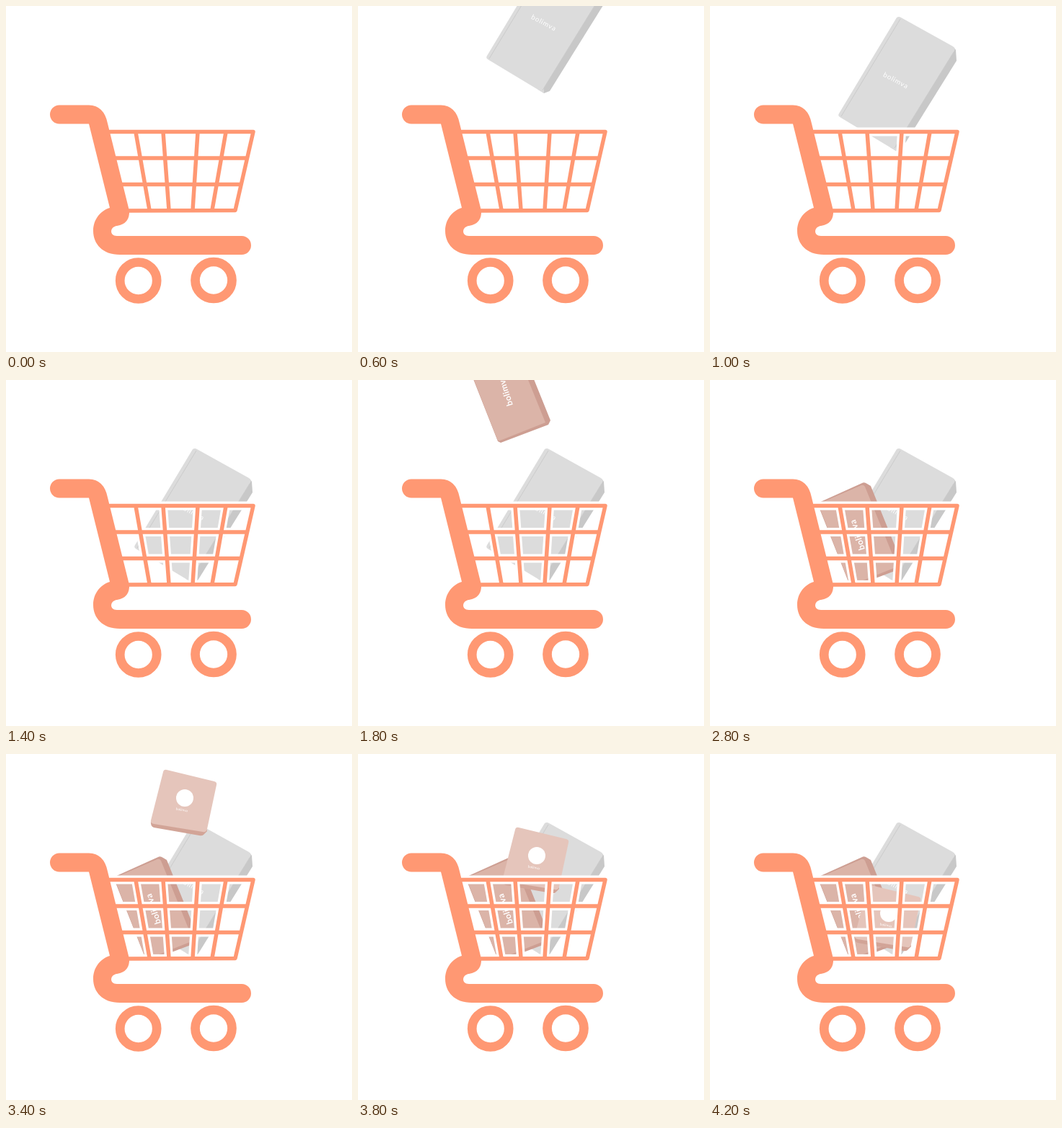
Animation of 480x480 px, one loop 4.4 s. Source, as an HTML page:

```html
<!DOCTYPE html>
<html lang="en">
<head>
<meta charset="utf-8">
<title>Filling cart</title>
<style>
  html, body { margin: 0; width: 100%; height: 100%; overflow: hidden; background: #fff; }
  svg { display: block; width: 100vw; height: 100vh; }
  text { fill: #fff; font-family: Lato, "Open Sans", sans-serif; text-anchor: middle; dominant-baseline: central; }
  .drop { animation: 4400ms infinite step-end; }
  .tall { animation-name: first; }
  .rose { animation-name: second; }
  .small { animation-name: third; }

  /* Each box falls 240px in six steps of 200ms, then rests. */
  @keyframes first {
    0% { transform: translateY(-400px); }
    4.5455% { transform: translateY(-240px); animation-timing-function: steps(6, end); }
    31.8182%, 100% { transform: none; }
  }
  @keyframes second {
    0% { transform: translateY(-400px); }
    36.3636% { transform: translateY(-240px); animation-timing-function: steps(6, end); }
    63.6364%, 100% { transform: none; }
  }
  @keyframes third {
    0% { transform: translateY(-400px); }
    68.1818% { transform: translateY(-240px); animation-timing-function: steps(6, end); }
    95.4545%, 100% { transform: none; }
  }
</style>
</head>
<body>
<svg viewBox="0 0 480 480">
  <defs>
    <path id="grid" fill="none" stroke-linecap="round" stroke-linejoin="round"
      d="M144 174.5H343L318 283.5L168 284M152 211H334M161 247.5H326M180 175L199 283M218 175L226 283M266 175L259 283M305 175L286 283"/>
  </defs>

  <g class="drop tall">
    <g transform="translate(0 80)">
      <path fill="#c8c8c8" d="M338 57L341 61L342 76L266 198L258 201L250 196Z"/>
      <path fill="#dcdcdc" d="M259 16Q262 14 265 16L337 56Q341 59 339 62L258 193V201L180 154Q177 152 179 149Z"/>
      <path fill="none" stroke="#cbcbcb" d="M264 18L182 153M338 64L256 197"/>
      <text transform="translate(258 103) rotate(28)" font-size="9.5" letter-spacing=".8">bolimva</text>
    </g>
  </g>

  <g class="drop rose">
    <g transform="translate(0 120)">
      <path fill="#cd9e92" d="M149 51L211 23Q214 21 218 24L223 27L267 136L264 142L198 167L194 165Z"/>
      <path fill="#dbb4a8" d="M150 52L210 26Q213 25 215 28L260 139L197 164Q194 165 193 162Z"/>
      <text transform="translate(204 95) rotate(-108)" font-size="12" font-weight="700" letter-spacing=".3">bolimva</text>
    </g>
  </g>

  <g class="drop small">
    <g transform="translate(0 160)">
      <path fill="#d2a497" d="M201 93L278 102L279 107L274 112Q272 114 268 113L205 102Q200 100 201 93Z"/>
      <path fill="#e5c5bb" d="M218 25Q219 21 223 22L289 38Q293 39 292 43L279 104Q278 109 273 108L205 97Q200 96 201 92Z"/>
      <circle cx="248" cy="61" r="12" fill="#fff"/>
      <text transform="translate(244 77) rotate(11)" font-size="4.8">bolimva</text>
    </g>
  </g>

  <use href="#grid" stroke="#fff" stroke-width="12"/>
  <use href="#grid" stroke="#ff9873" stroke-width="5.5"/>
  <path fill="#ff9873" d="M74 137.5H115Q136 138 141 163L171 284Q172 302 154 305C144 306 143 319 154 319H327A13 13 0 0 1 327 345H158C134 345 121 330 121 312C121 296 131 284 144 280L115 163.5H74A13 13 0 0 1 74 137.5Z"/>
  <g fill="none" stroke="#ff9873" stroke-width="12.7">
    <circle cx="183.7" cy="381" r="25.5"/>
    <circle cx="288" cy="380.5" r="25.5"/>
  </g>
</svg>
</body>
</html>
```
